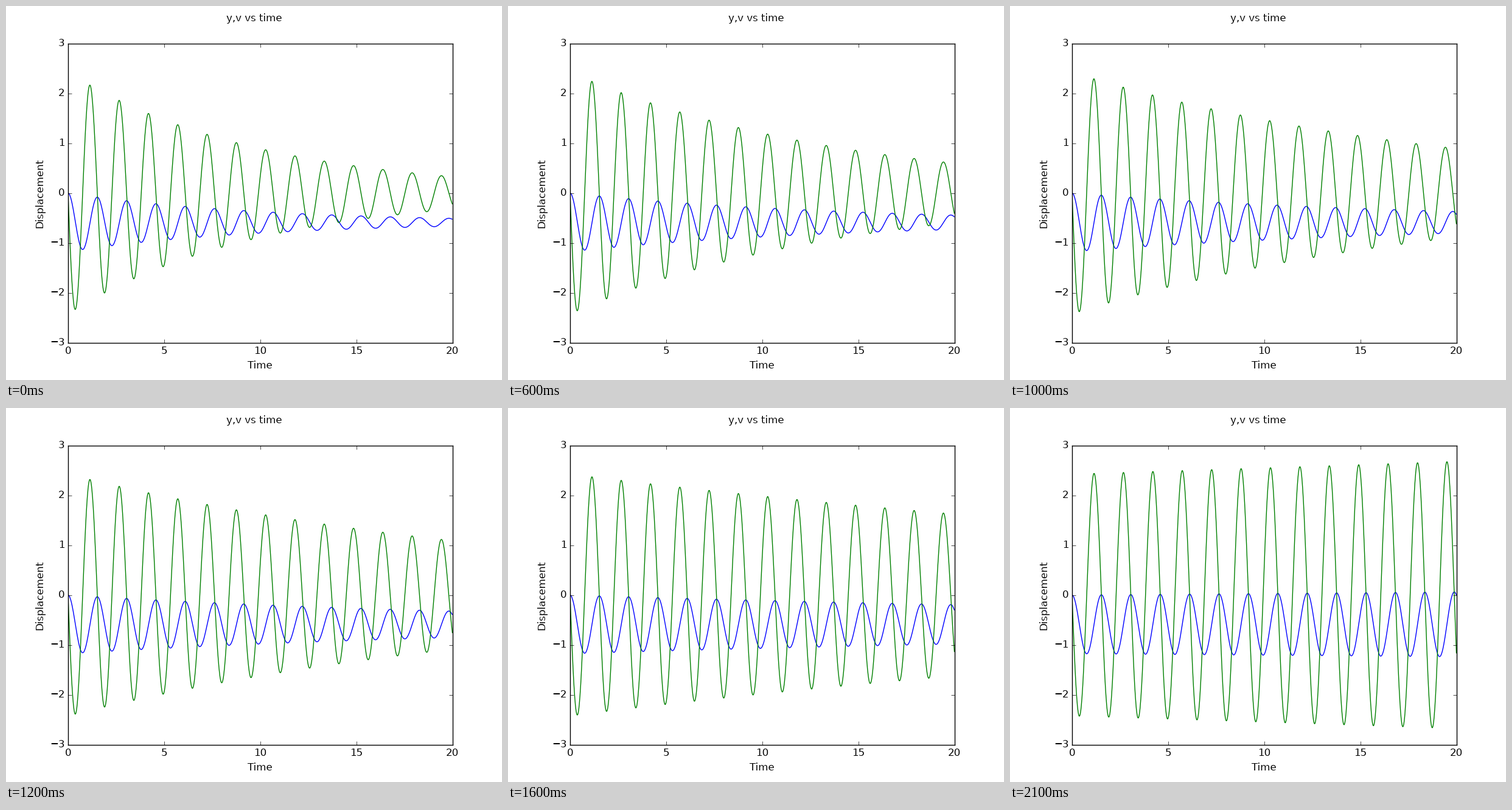
These frames come from a looping animation (815x615 px, 2200 ms). A matplotlib script:

```python
import numpy as np
import matplotlib.pyplot as plt
from matplotlib.animation import FuncAnimation

plt.rcParams.update({
    "font.family": "DejaVu Sans",
    "font.size": 12,
    "text.hinting": "default",
    "text.hinting_factor": 8,
    "axes.linewidth": 1.0,
    "axes.labelsize": 12,
    "axes.labelpad": 5.0,
    "axes.axisbelow": False,
    "figure.titlesize": 12,
    "lines.linewidth": 1.0,
    "lines.solid_capstyle": "butt",
    "xtick.alignment": "center",
    "ytick.alignment": "center",
    "savefig.facecolor": "white",
})

W, H, DPI = 815, 615, 100
FRAMES, INTERVAL = 22, 100
G, K = 10.0, 17.0            # gravity and stiffness per unit mass
RATE, RATE_STEP = 0.1, 0.005  # decay rate and its drop per frame
DRIFT = 1.004                # period stretch once the oscillation grows

t = np.linspace(0, 20, 1001)


def motion(rate):
    """Position and velocity of a mass dropped on a damped spring."""
    omega = np.sqrt(K - rate**2)
    s = t / DRIFT if rate < -1e-9 else t
    decay = np.exp(-rate * s)
    sin, cos = np.sin(omega * s), np.cos(omega * s)
    y = -G / K * (1 - decay * (cos + rate / omega * sin))
    v = -G / omega * decay * sin
    return y, v


fig = plt.figure(figsize=(W / DPI, H / DPI), dpi=DPI, facecolor="white")
ax = fig.add_axes([0.125, 0.1, 0.775, 0.8])
ax.set(xlim=(0, 20), ylim=(-3, 3), xlabel="Time", ylabel="Displacement",
       xticks=range(0, 21, 5), yticks=range(-3, 4))
ax.tick_params(direction="in", length=4, width=0.5, pad=4,
               top=True, right=True)
fig.suptitle("y,v vs time")

y_line, = ax.plot([], [], color=(0, 0, 1))
v_line, = ax.plot([], [], color=(0, 0.5, 0))


def update(i):
    y, v = motion(RATE - RATE_STEP * i)
    y_line.set_data(t, y)
    v_line.set_data(t, v)
    return y_line, v_line


anim = FuncAnimation(fig, update, frames=FRAMES, interval=INTERVAL,
                     repeat=True, repeat_delay=0, blit=False)
plt.show()
```
